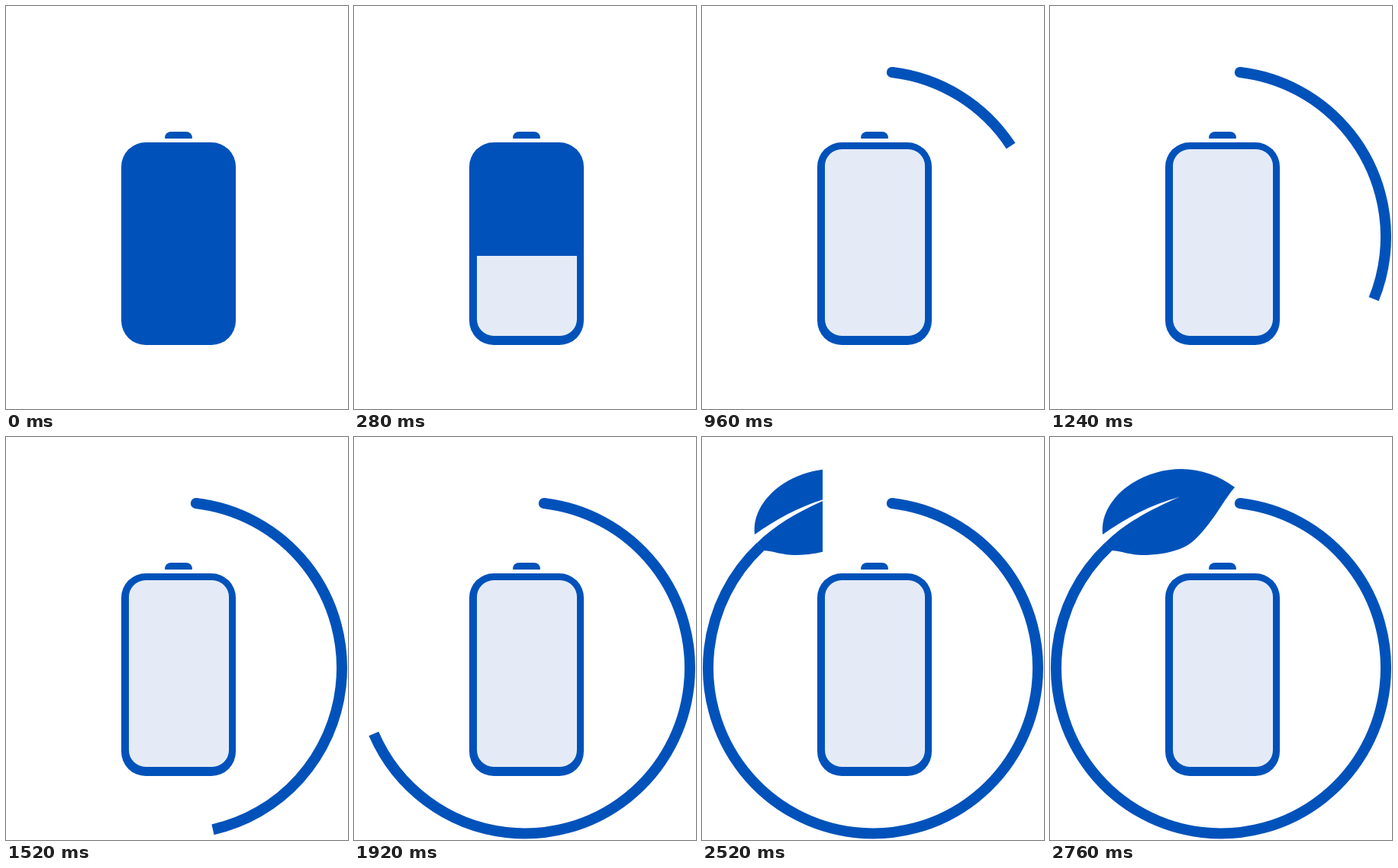
Recreate the animation shown at these times as an HTML page with a canvas. Size 448x529 px, loop 2.84 s.

```html
<!DOCTYPE html>
<html lang="en">
<head>
<meta charset="utf-8">
<title>Green battery</title>
<style>
  html, body { margin: 0; width: 100%; height: 100%; overflow: hidden; background: #fff; }
  canvas { display: block; }
</style>
</head>
<body>
<canvas id="stage" width="448" height="529"></canvas>
<script>
const ctx = document.getElementById('stage').getContext('2d');
const BLUE = '#0052ba', LIGHT = '#e4ebf6';
const LOOP = 2840, STEP = 40, LAST = 69;
const RING = { x: 224, y: 303, rx: 216, ry: 217.5, from: -83.4, to: 227 };

const leaf = new Path2D(`M69 128 C66 100 84 76 107 61 C128 48 150 42 172 42
  C198 42 222 51 242 66 C230 80 222 96 208 114 C196 129 186 141 170 147
  C154 153 137 155 121 155 C106 155 94 150 81 149 L72 139
  C97 114 128 97 169 79 C132 89 100 106 69 128 Z`);

const rad = deg => deg * Math.PI / 180;

function box(color, x, y, w, h, r) {
  ctx.fillStyle = color;
  ctx.beginPath();
  ctx.roundRect(x, y, w, h, r);
  ctx.fill();
}

function clipped(x, y, w, h, paint) {
  ctx.save();
  ctx.beginPath();
  ctx.rect(x, y, w, h);
  ctx.clip();
  paint();
  ctx.restore();
}

function drawBattery(step) {
  box(BLUE, 208, 165, 36, 9, [8, 8, 1, 1]);
  box(BLUE, 151, 179, 150, 266, 32);
  const top = Math.max(188, 433 - 15 * step);
  clipped(161, top, 131, 433 - top, () => box(LIGHT, 161, 188, 131, 245, 22));
}

function drawRing(step) {
  if (step < 18) return;
  const { x, y, rx, ry, from, to } = RING;
  const end = Math.min(to, -33.3 + 7.91 * (step - 24));
  ctx.strokeStyle = ctx.fillStyle = BLUE;
  ctx.lineWidth = 14;
  ctx.beginPath();
  ctx.ellipse(x, y, rx, ry, 0, rad(from), rad(end));
  ctx.stroke();
  ctx.beginPath();
  ctx.arc(x + rx * Math.cos(rad(from)), y + ry * Math.sin(rad(from)), 7, 0, 2 * Math.PI);
  ctx.fill();
}

function drawLeaf(step) {
  if (step < 57) return;
  const right = 158 + 14 * (step - 63);
  clipped(0, 0, right, 200, () => {
    ctx.fillStyle = BLUE;
    ctx.fill(leaf);
  });
}

function draw() {
  const step = Math.min(LAST, Math.floor(performance.now() % LOOP / STEP));
  ctx.fillStyle = '#fff';
  ctx.fillRect(0, 0, 448, 529);
  drawBattery(step);
  drawRing(step);
  drawLeaf(step);
  requestAnimationFrame(draw);
}
draw();
</script>
</body>
</html>
```
